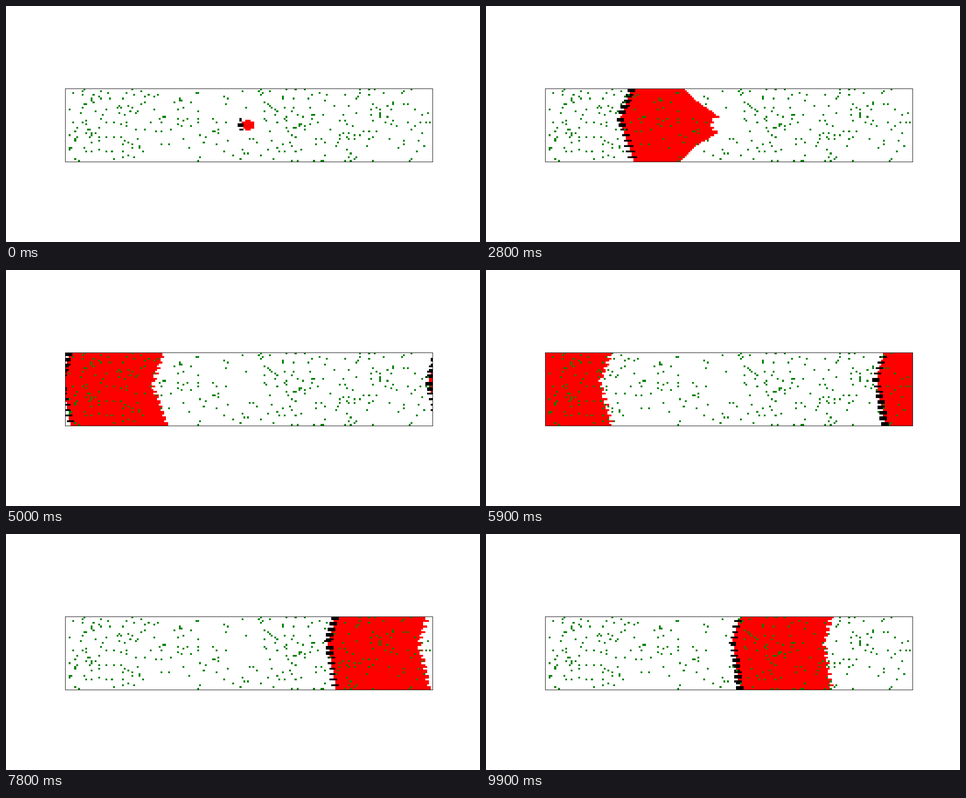
Animation, 1058 px wide and 529 px high, one loop 10 s. Source, as a matplotlib script:

```python
import numpy as np
import matplotlib.pyplot as plt
from matplotlib.animation import FuncAnimation
from matplotlib.colors import ListedColormap

COLS, ROWS = 200, 40
FRAMES, INTERVAL = 100, 100
RED_AGE = 25          # frames a cell stays red after firing
MAX_JUMP = 5          # most columns a row can gain at once
PAD = 120             # room for the wave running past the left side
NEVER = -999
WHITE, RED, BLACK, GREEN = range(4)


def make_inert():
    mask = np.random.default_rng(12).random((ROWS, COLS)) < 0.041
    mask[12:25, 90:108] = False     # keep the starting spot clear
    return mask


def fires_on_odd(row):
    """Rows take turns in groups of three, so the front looks toothed."""
    if row < 15:
        return row % 3 == 2
    return row % 3 == 0 or (row > 22 and row % 3 == 2)


def front(row, t):
    """Column of the wave front: a V that flattens and drifts upwards."""
    fade = np.exp(-t / 30)
    mid = 12 + 7.5 * np.exp(-t / 45)
    if row < mid:
        lag = (0.25 + 0.35 * fade) * (mid - row)
    else:
        lag = (0.12 + 0.5 * fade) * (row - mid)
    return int(np.floor(93.85 - 1.95 * t + lag))


def make_firing():
    """Frame at which every cell of the unrolled strip fires."""
    fired = np.full((ROWS, PAD + COLS), NEVER)
    fired[17:23, PAD + 98:PAD + 101] = -3
    fired[18:22, PAD + 96:PAD + 103] = -4

    # the young wave widens row by row, leaving a wedge behind it
    rows = np.arange(ROWS)
    last = np.interp(rows, [0, 5, 16, 22, 31, 39], [75, 80, 95, 96, 81, 73])
    start = np.maximum(0, 0.75 * (95 - last))
    edge = np.round(last).astype(int) + 1
    for t in range(FRAMES):
        for r in rows:
            if fires_on_odd(r) != (t % 2 == 1) or t < start[r]:
                continue
            left = min(edge[r], max(front(r, t), edge[r] - MAX_JUMP))
            fired[r, PAD + left:PAD + edge[r]] = t
            edge[r] = left
    return fired


inert = make_inert()
fired = make_firing()


def grid_at(t):
    grid = np.full((ROWS, COLS), WHITE)
    age = t - fired
    for mask, state in (((age > 0) & (age <= RED_AGE), RED), (age == 0, BLACK)):
        r, c = np.nonzero(mask)
        grid[r, (c - PAD) % COLS] = state
    grid[inert] = GREEN
    return grid


fig = plt.figure(figsize=(1058 / 100, 529 / 100), dpi=100, facecolor="white")
ax = fig.add_axes([0.125, 0.11, 0.775, 0.77])
image = ax.imshow(grid_at(0), cmap=ListedColormap(["white", "red", "black", "green"]),
                  vmin=0, vmax=3, interpolation="nearest")
ax.set_xticks([])
ax.set_yticks([])
for spine in ax.spines.values():
    spine.set_linewidth(0.72)       # one pixel


def update(t):
    image.set_data(grid_at(t))
    return (image,)


anim = FuncAnimation(fig, update, frames=FRAMES, interval=INTERVAL,
                     repeat=True, repeat_delay=0, blit=False)
plt.show()
```
